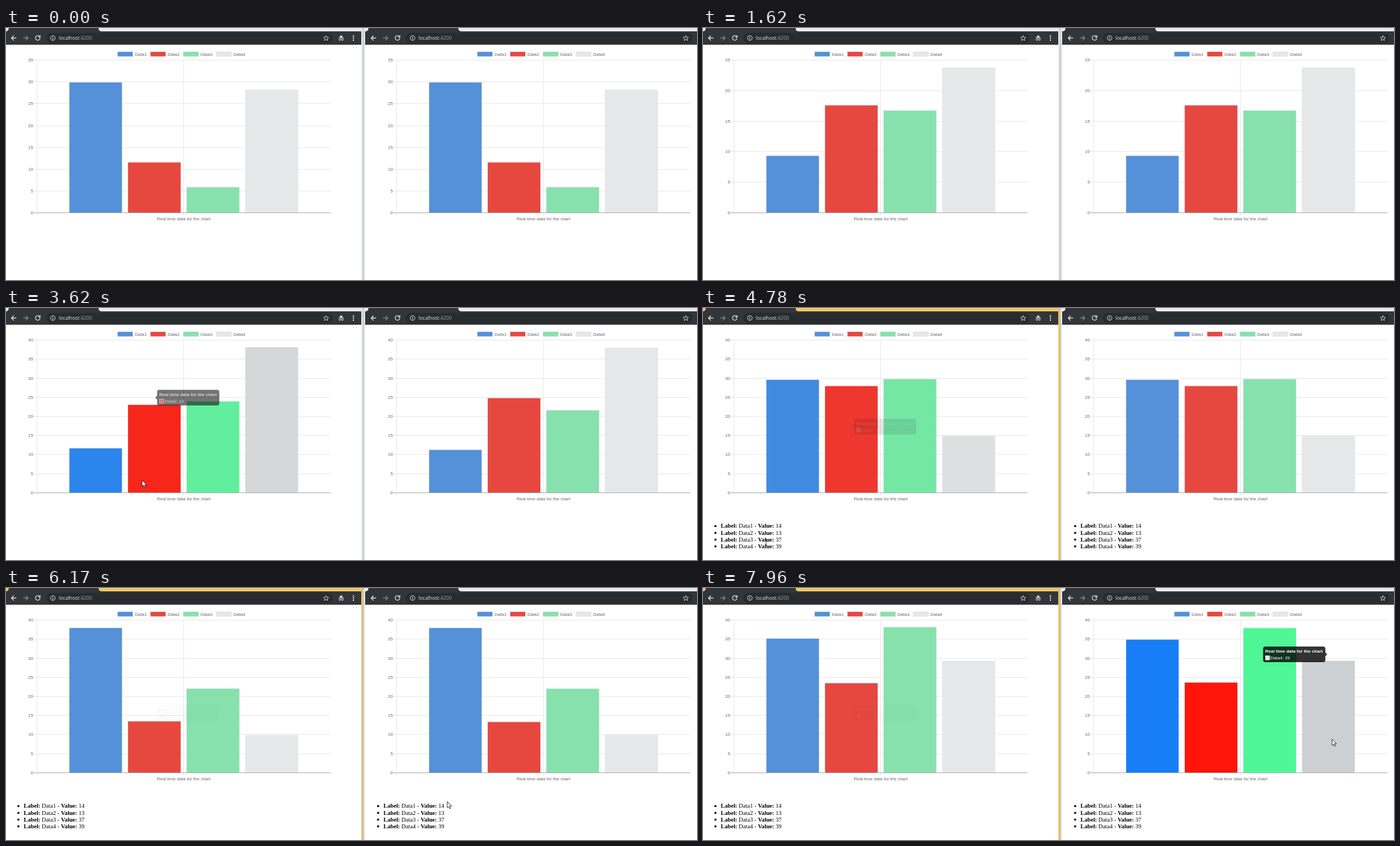
An HTML page for the animation above (8000 ms loop, 1239 by 452 pixels).

```html
<!DOCTYPE html>
<html lang="en">
<head>
<meta charset="utf-8">
<title>Real time chart</title>
<style>
  html, body { margin: 0; width: 100%; height: 100%; overflow: hidden; background: #fff; }
  svg { display: block; width: 100%; height: 100%; }
  .chart text { font: 8px "Liberation Sans", Arial, sans-serif; fill: #666; }
  .axis text { text-anchor: end; }
  .grid { stroke: #e6e6e6; shape-rendering: crispEdges; }
  .key, .bar { stroke: #e4e6e8; stroke-width: .7; }
  .url { font: 8.8px "Open Sans", "Noto Sans", sans-serif; fill: #e8eaed; }
  .url .port { fill: #9aa0a6; }
  .icon { fill: none; stroke: #e8eaed; stroke-width: 1.3; }
  .list { font: 10.667px "Liberation Serif", "Times New Roman", serif; }
  .list .b { font-weight: bold; }
  .tip > * { opacity: var(--alpha, 0); }
  .tip .back { fill: #000c; }
  .chart .tip text { fill: #fff; }
  .chart .tip .title { font-weight: bold; }
</style>
</head>
<body>
<svg id="stage" viewBox="0 0 1239 452"></svg>
<script>
const LOOP = 8000, TOP = 57.8, BASE = 331.3, DX = 645;
const COLORS = [[212.5, 62.7, 59], [2.9, 76.9, 57.6], [145.3, 60, 70.6], [210, 4.2, 90.6]];
const TAB_IDLE = '#e8eaed', TAB_ACTIVE = '#f0c66b';
const LIST_AT = 4400, ENTER = 3521, LEAVE = 4549, ENTER_RIGHT = 7600;

// Data pushes; the right window may lag behind the left one
const pushes = [
  { at: -1500, lag: 0, data: [14, 5, 4, 31] },
  { at: -500, lag: 0, data: [31, 12, 6, 28] },
  { at: 550, lag: -38, data: [11, 27, 30, 37] },
  { at: 1520, lag: 0, data: [14, 19, 13, 25] },
  { at: 2537, lag: 0, data: [7, 25, 8, 28] },
  { at: 3460, lag: 35, data: [14, 13, 37, 39] },
  { at: 4549, lag: 0, data: [38, 36, 26, 2] },
  { at: 5555, lag: -35, data: [38, 13, 22, 10] },
  { at: 6620, lag: 0, data: [33, 25, 36, 30] },
  { at: 7680, lag: 50, data: [36, 23, 39, 29] }
];
const picked = pushes[5].data, last = pushes[9].data;

// Pointer way points: time, x, y
const mouse = [[3240, 240, 290], [3540, 244, 309], [3740, 244, 309], [4500, 113, 415], [4950, 113, 415],
               [6170, 791, 383], [6850, 870, 434], [7570, 1098, 338], [7960, 1128, 271]];

const clamp = x => Math.min(1, Math.max(0, x));
const outQuart = x => 1 - (1 - clamp(x)) ** 4;
const mix = (a, b, k) => a + (b - a) * k;
const range = n => [...Array(n).keys()];
const axisMax = data => Math.ceil(Math.max(...data) / 5) * 5;
const toY = (v, max) => BASE - v * (BASE - TOP) / max;
// Hovered bars are half again as saturated and a tenth darker
const color = ([h, s, l], hover = 0) =>
  `hsl(${h} ${mix(s, Math.min(100, s * 1.5), hover)}% ${l * (1 - .1 * hover)}%)`;

function pointer(t) {
  const i = Math.max(1, mouse.findIndex(m => m[0] > t)), a = mouse[i - 1], b = mouse[i];
  const k = clamp((t - a[0]) / (b[0] - a[0]));
  return [mix(a[1], b[1], k), mix(a[2], b[2], k)];
}

const toolbar = () => `
  <rect class="strip" x="-1" width="638" height="7" fill="${TAB_IDLE}"/>
  <path d="M-1 6Q5 6 5 0H166Q166 6 172 6H638V30H-1Z" fill="#323639"/>
  <rect x="72" y="8.5" width="514" height="19" rx="9.5" fill="#282c2f"/>
  <g class="icon">
    <path d="M18.5 18H10M14 13.8L9.8 18L14 22.2"/>
    <path d="M31 18H39.5M35.5 13.8L39.7 18L35.5 22.2" stroke="#85888b"/>
    <path d="M60.3 15.4A4.1 4.1 0 1 0 61 18.6M61.3 13.2V16.7H57.8"/>
    <circle cx="84" cy="18" r="4.2" stroke-width="1"/>
    <path d="M84 17.3V20.6M84 15.2V16.4" stroke-width="1.1"/>
    <path d="M574 13.6L575.3 16.7L578.6 17L576.1 19.2L576.9 22.4L574 20.7L571.1 22.4L571.9 19.2L569.4 17L572.7 16.7Z" stroke-width=".9"/>
    <path d="M596.5 17.6H605.5" stroke-width="1.1"/>
    <path d="M598.3 16.6L599.2 13.7H602.8L603.7 16.6Z" fill="#e8eaed" stroke="none"/>
    <path d="M600.3 20.6H601.7" stroke-width=".9"/>
    <circle cx="598.7" cy="20.8" r="1.6" stroke-width=".9"/>
    <circle cx="603.3" cy="20.8" r="1.6" stroke-width=".9"/>
  </g>
  ${range(3).map(i => `<circle cx="623" cy="${14.3 + i * 3.7}" r="1.2" fill="#e8eaed"/>`).join('')}
  <text class="url" x="94.7" y="21.3">localhost<tspan class="port">:4200</tspan></text>`;

const tooltip = (x, caret, item, value) => `
  <g class="tip">
    <rect class="back" x="${x}" y="-14" width="111.6" height="28" rx="4"/>
    <path class="back" d="${caret}"/>
    <text class="title" x="${x + 3.8}" y="-2.7">Real time data for the chart</text>
    <rect x="${x + 3.9}" y="2.2" width="8.2" height="8.2" fill="#fff"/>
    <rect x="${x + 4.6}" y="2.9" width="6.8" height="6.8" fill="${color(COLORS[item])}"/>
    <text x="${x + 13.3}" y="9.3">Data${item + 1}: ${value}</text>
  </g>`;

const chart = tip => `
  <g class="chart">
    ${COLORS.map((c, i) => `
      <rect class="key" x="${200 + i * 58.9}" y="42.5" width="27.5" height="8.6" fill="${color(c)}"/>
      <text x="${231 + i * 58.9}" y="49.8">Data${i + 1}</text>`).join('')}
    <path class="grid" d="M55.5 58V337M318.5 58V337"/>
    <g class="axis">${range(9).map(i =>
      `<g><path class="grid" d="M49 .5H582"/><text x="48.7" y="3">${i * 5}</text></g>`).join('')}</g>
    ${COLORS.map((c, i) => `<rect class="bar" x="${113.3 + i * 105.25}" width="94.8"/>`).join('')}
    <path d="M49 331.5H582" stroke="#a6a6a6" shape-rendering="crispEdges"/>
    <text x="318.7" y="345.2" text-anchor="middle">Real time data for the chart</text>
    ${tip}
  </g>`;

const list = () => `
  <g class="list">${picked.map((v, i) => `
    <circle cx="22.3" cy="${391.2 + i * 12.1}" r="1.9"/>
    <text x="31.8" y="${394.4 + i * 12.1}"><tspan class="b">Label:</tspan> Data${i + 1} - <tspan class="b">Value:</tspan> ${v}</text>`).join('')}
  </g>`;

const stage = document.getElementById('stage');
const tips = [tooltip(270.9, 'M271 -3.6L267.7 0L271 3.6Z', 1, picked[1]),
              tooltip(359.3, 'M470.8 -3.6L474.2 0L470.8 3.6Z', 3, last[3])];
stage.innerHTML = tips.map((tip, i) =>
  `<g class="panel" transform="translate(${i * DX})">${toolbar()}${chart(tip)}${list()}</g>`).join('') + `
  <rect x="637" width="7" height="452" fill="#e6e7e9"/>
  <rect id="edge" x="637" width="3" height="452"/>
  <rect x="640" width="1" height="452" fill="#a5a6a8"/>
  <path id="arrow" d="M0 0V11.2L2.6 8.8L4.4 12.8L6.2 12L4.5 8.1H8Z" fill="#fff" stroke="#111" stroke-width=".9"/>
  <path id="beam" d="M-2 0.5H2M0 .5V10.5M-2 10.5H2" fill="none" stroke="#222" stroke-width=".9"/>`;

const find = (el, sel) => el.querySelector(sel);
const set = (el, attrs) => { for (const k in attrs) el.setAttribute(k, attrs[k]); };
const show = (el, on) => set(el, { visibility: on ? 'visible' : 'hidden' });
const panels = [...stage.querySelectorAll('.panel')].map(el => ({
  bars: [...el.querySelectorAll('.bar')],
  ticks: [...find(el, '.axis').children],
  tip: find(el, '.tip'),
  list: find(el, '.list')
}));
const strip = find(stage, '.strip'), edge = find(stage, '#edge');
const arrow = find(stage, '#arrow'), beam = find(stage, '#beam');

function drawPanel(p, side, t, hover, alpha, tipY) {
  const start = push => push.at + side * push.lag;
  let n = pushes.length - 1;
  while (n > 1 && start(pushes[n]) > t) n--;
  const from = pushes[n - 1].data, to = pushes[n].data;
  const oldMax = axisMax(from), max = axisMax(to);
  const e = outQuart((t - start(pushes[n])) / 1000);
  p.bars.forEach((bar, i) => {
    const y = mix(toY(from[i], oldMax), toY(to[i], max), e);
    set(bar, { y, height: BASE - y, fill: color(COLORS[i], hover) });
  });
  p.ticks.forEach((tick, i) => {
    set(tick, { transform: `translate(0 ${Math.floor(toY(i * 5, max))})` });
    show(tick, i * 5 <= max);
  });
  p.tip.style.setProperty('--alpha', alpha);
  set(p.tip, { transform: `translate(0 ${tipY})` });
  show(p.list, t >= LIST_AT);
}

function draw(t) {
  const fade = 1 - outQuart((t - LEAVE) / 1000);
  const over = outQuart((t - ENTER) / 400) * fade;
  const alpha = t < LEAVE ? over : Math.max(.02, fade ** 2);
  const tipY = 160.5 + 31.5 * outQuart((t - 3620) / 1000) + 32 * (1 - fade);
  drawPanel(panels[0], 0, t, over, alpha, tipY);
  const overRight = outQuart((t - ENTER_RIGHT) / 400);
  drawPanel(panels[1], 1, t, overRight, overRight, 119);

  const active = t >= LIST_AT;
  set(strip, { fill: active ? TAB_ACTIVE : TAB_IDLE });
  set(edge, { fill: active ? TAB_ACTIVE : '#e6e7e9' });

  const overText = t >= 4450 && t < 5050;
  const transform = `translate(${pointer(Math.min(t, 7959))})`;
  set(arrow, { transform });
  set(beam, { transform });
  show(arrow, t >= mouse[0][0] && !overText);
  show(beam, overText);
}

const begin = performance.now();
function tick() {
  draw((performance.now() - begin) % LOOP);
  requestAnimationFrame(tick);
}
tick();
</script>
</body>
</html>
```
